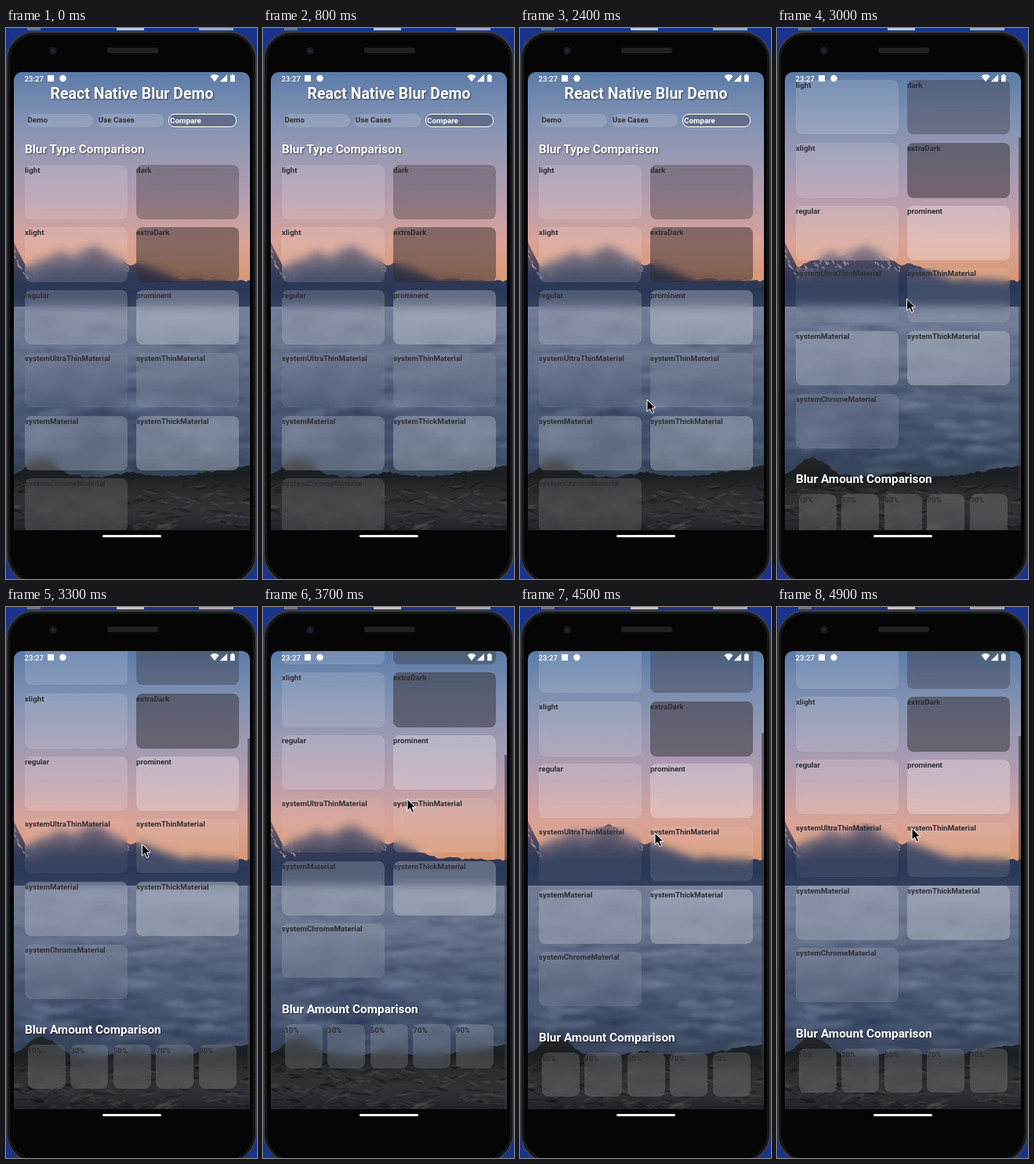
These frames come from a looping animation (320x700 px, 5000 ms). An HTML page with a canvas:

```html
<!DOCTYPE html>
<html lang="en">
<head>
<meta charset="utf-8">
<title>React Native Blur Demo</title>
<style>
  html, body { margin: 0; width: 100%; height: 100%; overflow: hidden; background: #19348f; }
  body { font-family: Roboto, "Noto Sans", sans-serif; }
  #stage { position: relative; width: 320px; height: 700px; overflow: hidden; background: #19348f; }
  #stage div, #stage svg, #stage canvas { position: absolute; box-sizing: border-box; }
  .scrap { top: 0; height: 3px; background: #c3c6cf; }
  #body { left: 0; top: 4px; width: 320px; height: 704px; border-radius: 36px 36px 40px 40px;
    background: #050506; border: 2px solid #3b3d42; box-shadow: inset 0 0 0 3px #17181b; }
  #speaker { left: 129px; top: 25px; width: 65px; height: 7px; border-radius: 3px; background: #202124; }
  #camera { left: 55px; top: 24px; width: 10px; height: 10px; border-radius: 50%;
    background: #242a3a; border: 3px solid #17191e; }
  #screen { left: 10px; top: 56px; width: 301px; height: 582px; overflow: hidden; border-radius: 10px 10px 0 0; }
  #photo { left: 0; top: 0; }
  #content { left: -10px; top: -56px; width: 320px; height: 808px; }
  .glass { backdrop-filter: blur(6px); border-radius: 8px; }
  .text { line-height: 20px; font-weight: 700; white-space: nowrap; color: #303036; }
  .head { color: #fff; text-shadow: 1px 1px 2px rgba(0, 0, 0, .55); }
  .white { color: #fff; }
  #bar { left: 298px; top: 0; width: 3px; height: 450px; background: rgba(55, 55, 62, .6); }
  #home { left: 123px; top: 644px; width: 75px; height: 3px; border-radius: 2px; background: #f4f4f4; }
  #status { left: 0; top: 56px; }
  #cursor { left: 0; top: 0; overflow: visible; }
</style>
</head>
<body>
<div id="stage">
  <div class="scrap" style="left:27px;width:17px;background:#6d7180"></div>
  <div class="scrap" style="left:141px;width:35px"></div>
  <div class="scrap" style="left:246px;width:44px;background:#a4a9b8"></div>
  <div id="body"></div>
  <div id="speaker"></div>
  <div id="camera"></div>
  <div id="screen">
    <canvas id="photo" width="301" height="582"></canvas>
    <div id="content"></div>
    <div id="bar"></div>
  </div>
  <svg id="status" width="320" height="18" viewBox="0 56 320 18" fill="#fff">
    <text x="23.5" y="67.6" font-size="9.6" font-weight="500">23:27</text>
    <rect x="53" y="60" width="8" height="8"/>
    <circle cx="72.5" cy="64" r="4.2"/>
    <path d="M260.5 61.2Q266 57 271.5 61.2L266 68.3Z"/>
    <path d="M282 59V68.3H272.7Z"/>
    <path d="M286 60h1.7v-1.2h2.2V60h1.7v8.3H286Z"/>
  </svg>
  <div id="home"></div>
  <svg id="cursor" width="14" height="20">
    <path d="M0 0V15L3.5 11.8L6 17.4L8.6 16.2L6.2 10.8H10.8Z" fill="#080808" stroke="#fff" stroke-linejoin="round"/>
  </svg>
</div>
<script>
const $ = id => document.getElementById(id);
const content = $('content'), bar = $('bar'), cursor = $('cursor');

function add(cls, style, label = '') {
  const el = document.createElement('div');
  el.className = cls;
  el.textContent = label;
  Object.assign(el.style, style);
  content.append(el);
  return el;
}
const box = (x, y, w, h, background) => add('glass',
  { left: x + 'px', top: y + 'px', width: w + 'px', height: h + 'px', background });
const text = (label, x, mid, size = 9.76, cls = '') => add('text ' + cls,
  { left: x + 'px', top: mid - 10 + 'px', fontSize: size + 'px' }, label);
const white = a => `rgba(255,255,255,${a})`;
const dark = a => `rgba(47,40,42,${a})`;

// Header
const title = text('React Native Blur Demo', 0, 83.5, 19.5, 'head');
title.style.width = '321px';
title.style.textAlign = 'center';
['Demo', 'Use Cases', 'Compare'].forEach((label, i) => {
  const x = 26.5 + i * 90.3, on = i === 2;
  const pill = box(x, 109, 84 + on * 3, 16.5, on ? 'rgba(50,50,75,.38)' : white(.14));
  if (on) pill.style.border = '1.5px solid #fff';
  text(label, x + 1 + on, 116.5 + on, 9.76, on ? 'white' : '');
});

// Blur types
text('Blur Type Comparison', 24, 154, 15.35, 'head');
Object.entries({
  light: white(.14), dark: dark(.32), xlight: white(.13), extraDark: dark(.48),
  regular: white(.17), prominent: white(.27),
  systemUltraThinMaterial: white(.06), systemThinMaterial: white(.1),
  systemMaterial: white(.2), systemThickMaterial: white(.26), systemChromeMaterial: white(.12)
}).forEach(([name, tint], i) => {
  const x = 24 + i % 2 * 142, y = 173.7 + (i >> 1) * 79.7;
  box(x, y, 131, 69.3, tint);
  text(name, x, y + 7);
});

// Blur amounts
text('Blur Amount Comparison', 24, 680.5, 15.35, 'head');
for (let i = 0; i < 5; i++) {
  const x = 27.5 + i * 54.6;
  box(x, 700, 48, 56, white(.15));
  text(10 + i * 20 + '%', x, 708);
}

// Backdrop: dusk sky, ridge, sea of clouds, rocks
const LEFT = 10, RIGHT = 311, TOP = 56, BOTTOM = 638;
const g = $('photo').getContext('2d');
g.translate(-LEFT, -TOP);

let seed = 11;
const rnd = () => (seed = seed * 16807 % 2147483647) / 2147483647;
const between = (a, b) => a + rnd() * (b - a);

function shade(y0, y1, ...colors) {
  const grad = g.createLinearGradient(0, y0, 0, y1);
  colors.forEach((c, i) => grad.addColorStop(i / (colors.length - 1), c));
  return grad;
}
function land(edge, rough, bottom, fill) {
  g.beginPath();
  g.moveTo(LEFT, bottom);
  for (let x = LEFT; x <= RIGHT + 4; x += 4) g.lineTo(x, edge(x) + between(-rough, rough));
  g.lineTo(RIGHT + 4, bottom);
  g.fillStyle = fill;
  g.fill();
}
function blob(x, y, w, h, tilt, fill) {
  g.beginPath();
  g.ellipse(x, y, w, h, tilt, 0, 7);
  g.fillStyle = fill;
  g.fill();
}
const tent = (x, mid, height, half) => height * Math.max(0, 1 - Math.abs(x - mid) / half);
const bump = (x, mid, height, half) => height * Math.exp(-(((x - mid) / half) ** 2));
const ridge = x => 312 + x * .03 -
  Math.max(tent(x, 6, 48, 24), tent(x, 70, 31, 60), tent(x, 112, 40, 75), tent(x, 168, 18, 55));
const rocks = x => 570 - bump(x, 45, 24, 26) - bump(x, 160, 6, 20) - bump(x, 311, 13, 60);

function drawPhoto() {
  g.fillStyle = shade(TOP, 326, '#5b7ba8', '#7d8fb2', '#9a99b2', '#b79daf', '#d9a397', '#d8966f');
  g.fillRect(LEFT, TOP, 301, 270);
  g.fillStyle = shade(354, 590, '#77809b', '#68738d', '#525f7b', '#44536f', '#2c3849');
  g.fillRect(LEFT, 326, 301, 312);

  g.filter = 'blur(2px)';
  for (let i = 0; i < 260; i++) {
    const d = rnd();
    blob(between(LEFT, RIGHT), 358 + d * 205, between(8, 34), 1 + d * 4, between(-.15, .15),
      rnd() < .45 ? 'rgba(150,160,188,.15)' : 'rgba(30,42,70,.17)');
  }
  g.filter = 'none';

  land(ridge, 1.5, 354, shade(270, 354, '#7c6870', '#5a5063', '#333b58', '#293757', '#33405e'));
  for (let i = 0; i < 70; i++) {
    const x = between(LEFT, 158);
    blob(x, ridge(x) + 2 + rnd() * 16, between(1, 4), 1, 1, 'rgba(205,180,182,.5)');
  }

  land(rocks, 1.5, BOTTOM, shade(545, BOTTOM, '#24282b', '#1b1e20', '#2b2e31', '#2f3235', '#202429'));
  for (let i = 0; i < 180; i++)
    blob(between(LEFT, RIGHT), between(580, 636), between(3, 12), between(.6, 2), between(-.5, .5),
      rnd() < .5 ? 'rgba(105,105,102,.2)' : 'rgba(8,10,12,.3)');
}
drawPhoto();

// Pointer path: time, x, y
const path = [[1100, 203, -20], [1500, 186, 149], [2400, 162, 472], [3000, 165.5, 344],
  [3700, 184, 244], [4100, 172, 293], [4900, 172, 281], [5000, 172, 281]];
const DRAG = 2400, TURN = 3700, GAIN = .84, MAX = 170;

function pointerAt(t) {
  const i = Math.max(1, path.findIndex(p => p[0] > t));
  const a = path[i - 1], b = path[i], k = Math.max(0, (t - a[0]) / (b[0] - a[0]));
  return [a[1] + (b[1] - a[1]) * k, a[2] + (b[2] - a[2]) * k];
}
// The page follows the drag up to its end, then back down.
function scrollAt(t, y) {
  if (t < DRAG) return 0;
  return t < TURN ? Math.min(MAX, GAIN * (472 - y)) : MAX - GAIN * (y - 244);
}

const start = performance.now();
function frame() {
  const t = Math.floor(Math.max(0, performance.now() - start) % 5000 / 100) * 100;
  const [x, y] = pointerAt(t), scroll = scrollAt(t, y);
  content.style.top = -TOP - scroll + 'px';
  bar.style.top = scroll * 582 / 752 + 'px';
  bar.style.visibility = scroll > 0 ? 'visible' : 'hidden';
  cursor.style.transform = `translate(${x}px, ${y}px)`;
  requestAnimationFrame(frame);
}
frame();
</script>
</body>
</html>
```
